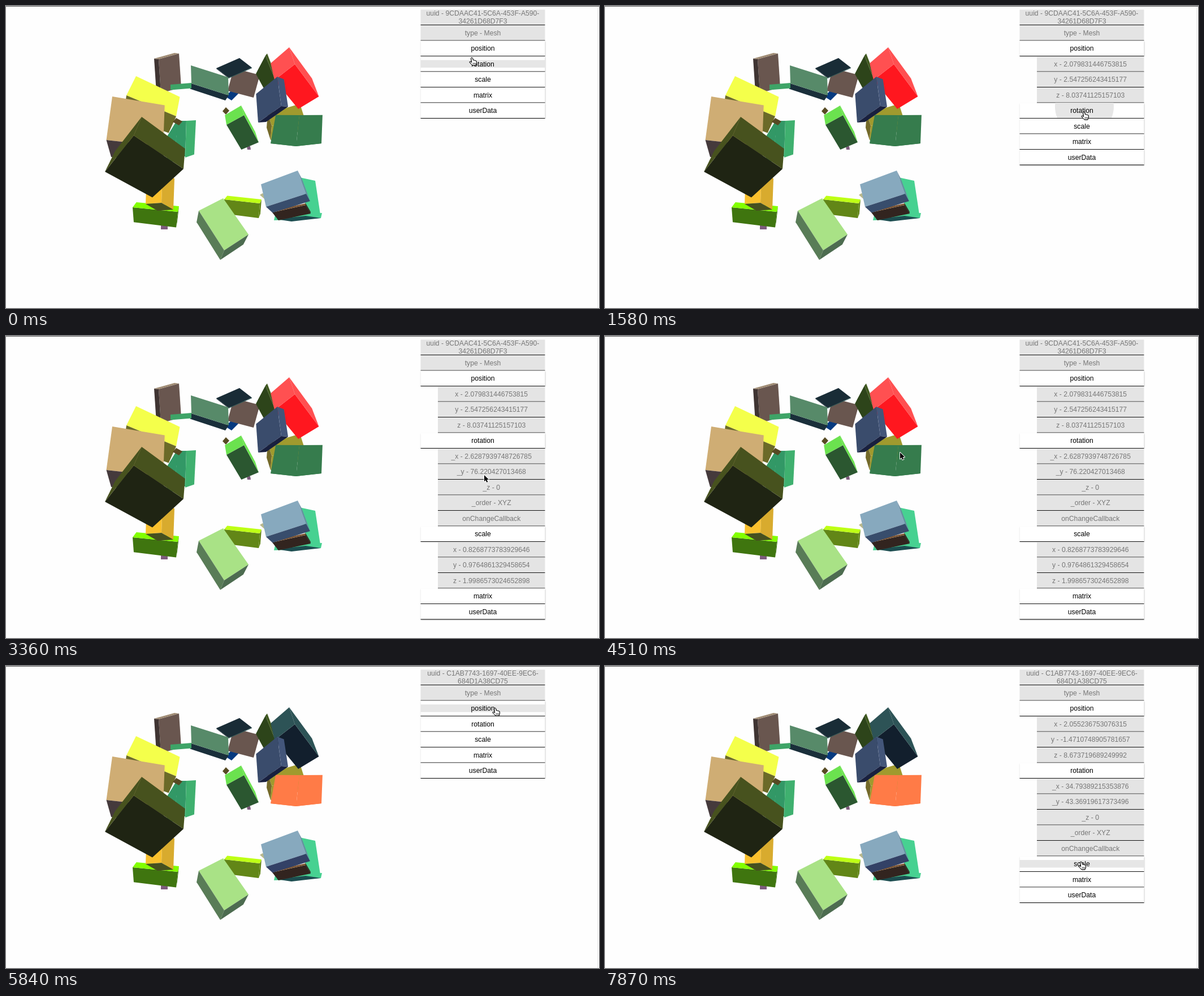
An HTML page with a canvas for the animation above (8 s loop, 1049x534 px).

```html
<!DOCTYPE html>
<html lang="en">
<head>
<meta charset="utf-8">
<title>Mesh inspector</title>
<style>
html, body { margin: 0; width: 100%; height: 100%; overflow: hidden; background: #fefefe; }
canvas { display: block; }
</style>
</head>
<body>
<canvas id="stage" width="1049" height="534"></canvas>
<script>
const ctx = document.getElementById('stage').getContext('2d');
const LOOP = 8000, STEP = 130;
const TOP = 6, PITCH = 27.5, LEFT = 733.5, RIGHT = 953.5, INDENT = 764;

const turn = (x, y) => ['_x - ' + x, '_y - ' + y, '_z - 0', '_order - XYZ', 'onChangeCallback'];
const MESHES = [
  {
    uuid: ['uuid - 9CDAAC41-5C6A-453F-A590-', '34261D68D7F3'],
    position: ['x - 2.079831446753815', 'y - 2.547256243415177', 'z - 8.03741125157103'],
    rotation: turn('2.6287939748726785', '76.220427013468'),
    scale: ['x - 0.8268773783929646', 'y - 0.9764861329458654', 'z - 1.9986573024652898']
  },
  {
    uuid: ['uuid - C1AB7743-1697-40EE-9EC6-', '684D1A38CD75'],
    position: ['x - 2.055236753076315', 'y - -1.4710748905781657', 'z - 8.673719689249992'],
    rotation: turn('34.79389215353876', '43.36919617373496')
  }
];
const GROUPS = ['position', 'rotation', 'scale', 'matrix', 'userData'];

// 'pick' selects the second mesh, any other click unfolds a group
const CLICKS = [[680, 'position'], [1700, 'rotation'], [2740, 'scale'], [4810, 'pick'], [6130, 'position'], [7040, 'rotation']];
const HOVERS = [[0, 'rotation'], [150, 'position'], [680, ''], [5840, 'position'], [6130, ''], [7870, 'scale']];

// Pointer: start, end, destination
const MOVES = [
  [150, 380, 843, 73], [680, 1200, 847, 187], [1700, 2470, 849, 352],
  [2740, 3250, 846, 246], [3400, 3770, 848, 350], [3920, 4510, 522, 206],
  [4980, 5840, 865, 74], [6130, 6620, 843, 180], [7040, 7300, 843, 304], [7570, 7870, 842, 346]
];

function stateAt(t) {
  let mesh = 0, open = [];
  for (const [, what] of CLICKS.filter(c => c[0] <= t)) {
    if (what === 'pick') { mesh = 1; open = []; } else open.push(what);
  }
  const hover = HOVERS.filter(h => h[0] <= t).pop()[1];
  const ripple = t >= 1580 && t < 1700 ? 'rotation' : '';
  return { mesh, open, hover, ripple };
}

function pointerAt(t) {
  let x = 824, y = 91;
  for (const [start, end, toX, toY] of MOVES) {
    if (t < start) break;
    const done = (Math.floor((t - start) / STEP) + 1) * STEP;
    const p = t >= end ? 1 : Math.min(1, done / (end - start + STEP));
    x += (toX - x) * p;
    y += (toY - y) * p;
  }
  return { x, y };
}

// A box seen from its nearest corner c: edges run to a, b and d, and the far
// corner of each face is their sum, drawn in by k for perspective.
// Colours are for the faces ab, bd and da.
function box(colors, k, cx, cy, ...ends) {
  const edges = [];
  for (let i = 0; i < ends.length; i += 2) edges.push([ends[i] - cx, ends[i + 1] - cy]);
  colors.forEach((color, i) => {
    if (!color) return;
    const [ux, uy] = edges[i], [vx, vy] = edges[(i + 1) % edges.length];
    ctx.beginPath();
    ctx.moveTo(cx, cy);
    ctx.lineTo(cx + ux, cy + uy);
    ctx.lineTo(cx + (ux + vx) * k, cy + (uy + vy) * k);
    ctx.lineTo(cx + vx, cy + vy);
    ctx.closePath();
    ctx.fillStyle = color;
    ctx.fill();
  });
}

function drawBoxes(second) {
  const purple = '#7d5c7c', umber = '#574a23', brown = '#69564f';

  // upper left and middle
  box([brown, '#3f3432', '#a08c74'], 1, 270, 94, 306, 84, 274, 154, 262, 93);
  box(['#053a80'], 1, 399, 167, 388, 160, 413, 153);
  box([brown], 1, 438, 162, 449, 122, 392, 150);
  box(['#192c36', '#2b5a58', '#192c36'], 1, 394, 127, 372, 110, 435, 109, 394, 128);
  box(['#1a2f3a'], 0.95, 394, 158, 388, 167, 328, 137);
  box(['#578a69'], 1, 328, 137, 394, 158, 327, 105);
  box(['#578a69'], 0, 335, 95, 393, 125, 327, 105);
  box(['#3ea467'], 1, 291, 148.5, 291, 139, 328, 145.5);

  // upper right
  const lit = second ? '#2d5356' : '#ff5051', shade = second ? '#121f2d' : '#ff171f';
  const flat = second ? '#ff7b47' : '#367c4d';
  box(['#2d441a', '#40591f', '#2d441a'], 0.85, 459, 88, 442, 120, 476, 130, 462, 84);
  box(['#a09a2e', '#73692a', '#a09a2e'], 1, 470, 212, 527, 195, 463, 190, 468, 237);
  box([shade, lit, lit], 0.93, 511, 103, 553.5, 160, 475, 131, 501, 73);
  box(['#3a4c6c', '#18203f', '#43567a'], 0.93, 487, 177, 480, 125, 446, 206, 499, 178);
  box([flat, flat, flat], 0.92, 513, 248, 558, 243, 468, 243, 519, 193);

  // centre
  box([umber], 1, 383, 186, 389, 179, 389, 192);
  box([purple], 1, 427, 254, 426, 248, 433, 254);
  box(['#2b5730', '#6be24f', '#6be24f'], 0.94, 421, 193, 390, 210, 447, 241, 416, 176);

  // left cluster
  box(['#329866', '#329866', '#329866'], 1, 302, 203, 319, 203, 286, 229, 300, 266);
  box(['#3fb06f'], 0.93, 319, 203, 336, 202, 317, 268);
  box(['#f4ff4b', '#6b6a28'], 0.9, 213, 158, 230, 124, 301, 195, 208, 195);
  box([umber], 1, 295, 205, 301, 198, 306, 211);
  box(['#cfad74', '#453a3c'], 0.93, 177.5, 237, 188, 160, 278, 248, 186, 267);
  box([purple], 1, 274, 395, 274, 388, 286, 395);
  box(['#3f750f', '#3f750f', '#82ff00'], 0.94, 304, 364, 224, 356, 301, 391.5, 306, 354);
  box(['#f9c02d', '#d8ab2e', '#46501f'], 1, 275, 348, 247, 350, 277, 293, 296, 360);
  box(['#1f2413', '#47521e', '#47521e'], 0.89, 226, 229, 314, 288, 175, 293, 240, 196);
  box(['#cfad74'], 0, 278, 241, 240, 197, 280, 190);

  // lower middle and right
  box(['#628617', '#628617', '#beff14'], 0.96, 449, 349, 386, 342, 447, 375, 452, 342);
  box(['#a9e286', '#597c57', '#4d6c50'], 0.94, 386, 432, 429, 404, 341, 362, 379, 449);
  box(['#b8b88c'], 1, 449, 334, 454, 331, 457, 341);
  box(['#47d191'], 1.05, 557, 375, 547, 309, 533, 373);
  box(['#47d191'], 1, 474, 379, 557, 375, 476, 370);
  box(['#1c4d50'], 1, 557, 375, 505, 381, 530, 371);
  box(['#32241f', '#32241f', '#7d5532'], 0.96, 530, 352, 471, 365, 539, 367, 530, 349);
  box(['#87a9be', second ? '#334166' : '#384d6c', '#698ba2'], 0.93, 531, 332, 516, 291, 460, 355, 538, 345);
}

function buildRows({ mesh, open }) {
  const data = MESHES[mesh];
  const rows = [{ lines: data.uuid }, { lines: ['type - Mesh'] }];
  for (const group of GROUPS) {
    rows.push({ lines: [group], group });
    if (open.includes(group)) rows.push(...data[group].map(text => ({ lines: [text], sub: true })));
  }
  return rows;
}

function drawRow(row, k, { hover, ripple }) {
  const y = TOP + PITCH * k, x = row.sub ? INDENT : LEFT, w = RIGHT - x;
  ctx.save();
  if (row.group) {
    ctx.shadowColor = 'rgba(0,0,0,.28)';
    ctx.shadowBlur = 2;
    ctx.shadowOffsetY = 1;
  }
  ctx.fillStyle = row.group ? '#fff' : '#e4e4e4';
  ctx.fillRect(x, y + 0.5, w, PITCH - 1);
  ctx.restore();

  ctx.fillStyle = '#e6e6e6';
  if (row.group && row.group === hover) ctx.fillRect(x, y + 7, w, 13.5);
  if (row.group && row.group === ripple) {
    ctx.save();
    ctx.beginPath();
    ctx.rect(x, y, w, PITCH - 1);
    ctx.clip();
    ctx.beginPath();
    ctx.arc(848, y + 7, 52, 0, Math.PI * 2);
    ctx.fill();
    ctx.restore();
  }
  ctx.fillStyle = '#111';
  ctx.fillRect(x, y + PITCH - 0.5, w, 1);

  ctx.fillStyle = row.group ? '#000' : '#777';
  const first = row.lines.length > 1 ? 11 : 18.2;
  row.lines.forEach((text, i) => ctx.fillText(text, (x + RIGHT) / 2, y + first + i * 13.7));
}

const HAND = new Path2D('M-1.4 1Q0-.9 1.4 1L2.5 5Q4 4 4.6 5.4Q6 4.6 6.6 6Q8 5.6 8.3 7.2L8.4 10L7 14H1L-1 11.5L-4 8.6Q-4.2 6.8-2.2 7.4L-.3 8.8Z');
const FINGERS = new Path2D('M2.2 9.5V12.3M4.2 9.5V12.3M6.1 9.5V12.3');
const ARROW = new Path2D('M0 0V11.3L2.6 8.9L4.3 12.8L6.3 12L4.6 8.1H8.1Z');

function drawPointer({ x, y }, rows) {
  const row = rows[Math.floor((y - TOP) / PITCH)];
  const hand = x > LEFT && x < RIGHT && row && row.group;
  const shape = hand ? HAND : ARROW;
  ctx.save();
  ctx.translate(x, y);
  ctx.lineJoin = 'round';
  ctx.lineWidth = hand ? 1 : 1.8;
  ctx.strokeStyle = hand ? '#000' : '#fff';
  ctx.fillStyle = hand ? '#fff' : '#000';
  ctx.stroke(shape);
  ctx.fill(shape);
  if (hand) {
    ctx.stroke(shape);
    ctx.lineWidth = 0.8;
    ctx.stroke(FINGERS);
  }
  ctx.restore();
}

function draw(t) {
  ctx.fillStyle = '#fefefe';
  ctx.fillRect(0, 0, 1049, 534);
  ctx.fillStyle = '#e6e6e6';
  ctx.fillRect(1046, 1, 1, 533);
  ctx.fillStyle = '#555';
  ctx.fillRect(0, 0, 1049, 1);

  const state = stateAt(t), rows = buildRows(state);
  drawBoxes(state.mesh === 1);
  ctx.font = '12.2px "Liberation Sans", Arial, sans-serif';
  ctx.textAlign = 'center';
  rows.forEach((row, k) => drawRow(row, k, state));
  drawPointer(pointerAt(t), rows);
}

const begin = performance.now();
function tick() {
  draw((performance.now() - begin) % LOOP);
  requestAnimationFrame(tick);
}
tick();
</script>
</body>
</html>
```
